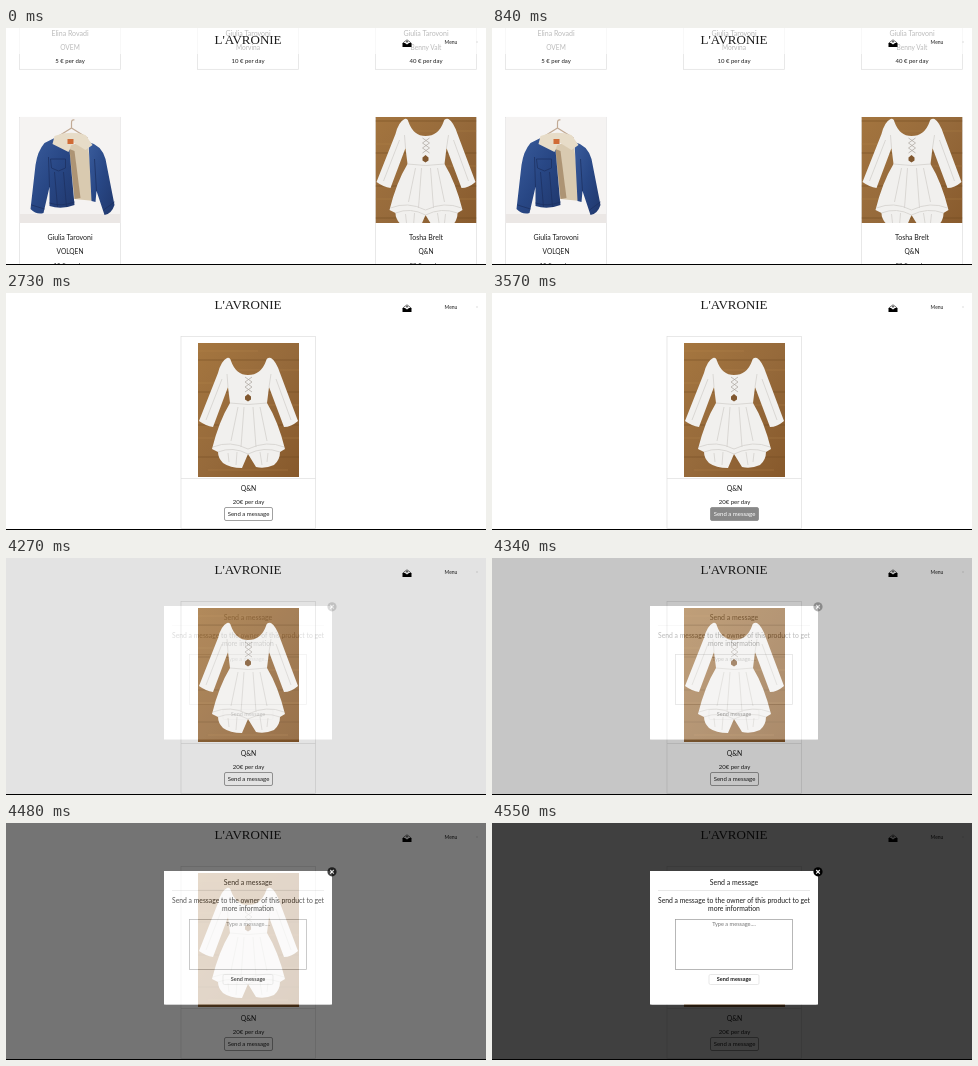
These frames come from a looping animation (480 by 237 pixels, 5.81 s). An HTML page:

```html
<!DOCTYPE html>
<html lang="en">
<head>
<meta charset="utf-8">
<title>Clothing rental</title>
<style>
  html, body { margin: 0; width: 100%; height: 100%; overflow: hidden; background: #fff; }
  svg { display: block; }
  text { font-family: Lato, "Open Sans", sans-serif; text-anchor: middle; fill: #1c1c1c; }
  .logo { font-family: "Liberation Serif", serif; }
  .hint { fill: #757575; }
  .line { fill: none; stroke: #dedede; stroke-width: .7; }
</style>
</head>
<body>
<svg id="stage" width="480" height="237" viewBox="0 0 480 237">
  <defs>
    <linearGradient id="wood" x2="1" y2="1">
      <stop stop-color="#a5763f"/><stop offset=".5" stop-color="#966a3b"/><stop offset="1" stop-color="#87592b"/>
    </linearGradient>
    <linearGradient id="denim" x2="1" y2="1">
      <stop stop-color="#3a5c9c"/><stop offset=".5" stop-color="#284785"/><stop offset="1" stop-color="#20376c"/>
    </linearGradient>

    <g id="dress">
      <rect width="101" height="134" fill="url(#wood)"/>
      <path d="M0 17H101M0 49H101M0 82H101M0 114H101" stroke="#6d4822" stroke-width=".7" opacity=".7"/>
      <path d="M0 8H60M30 27H101M0 40H40M60 62H101M0 95H101M10 127H90" stroke="#b58950" stroke-width=".6" opacity=".6"/>
      <path fill="#f1f0ee" d="M29 15Q32 14 33 18Q38 32 50 32Q63 32 68 18Q69 14 73 15Q78 18 82 30L100 78Q93 84 86 84L74 52L71 44L69 60Q80 78 87 106L82 109Q82 117 76 122Q67 126 58 124L50 111L44 125Q32 125 25 120Q20 115 20 109L14 106Q21 78 32 60L30 44L27 52L15 84Q8 83 1 78L20 30Q23 18 29 15Z"/>
      <path fill="none" stroke="#d3d1cd" stroke-width=".8" d="M32 60Q50 63 69 60M30 44L29 31M71 44L73 31M40 64L33 98M46 64L43 104M55 64L58 104M62 64L69 98M15 104Q32 97 50 106Q69 97 86 104M24 36L8 77M78 36L93 77M20 109Q35 103 50 111Q66 103 82 109M30 110L31 119M70 110L69 119M39 109L38 122M62 109L64 122"/>
      <path fill="none" stroke="#aaa49d" stroke-width=".7" d="M47 34L54 39L47 44L54 49M54 34L47 39L54 44L47 49"/>
      <path fill="#80572f" d="M50 51L53 53.500V56.500L50 58.500L47 56.500V53.500Z"/>
    </g>

    <g id="jacket">
      <rect width="101" height="106" fill="#f5f3f2"/>
      <path d="M0 97H101V106H0Z" fill="#ebe7e5"/>
      <path d="M36 21L52 11L68 21M52 11V6Q52 2 55 3" fill="none" stroke="#c2aa95" stroke-width="1.200"/>
      <path fill="#d9cab0" d="M49 28L68 25L75 84L55 82Z"/>
      <path fill="#ad9474" d="M50 32L55 34L61 81L55 82Z"/>
      <path fill="url(#denim)" d="M35 21L25 26Q18 34 16 48L11 92Q17 98 24 96L30 70V89Q42 93 55 88L50 33Z"/>
      <path fill="url(#denim)" d="M69 25Q82 28 86 42L95 88Q92 97 85 98L77 74L76 85L72 84Z"/>
      <path fill="#e7dcc8" d="M35 19Q50 13 66 18L73 28L66 33L53 25L49 35L33 27Z"/>
      <path fill="none" stroke="#1d3262" stroke-width=".8" d="M29 40L30 70M31 42H46V51L39 54L32 51ZM35 55L38 90M44 55L47 90M30 86Q42 90 55 85M77 74L75 42M12 88L25 92M84 93L95 85"/>
      <rect x="48" y="22" width="6" height="5" fill="#d06b35"/>
    </g>
  </defs>

  <g id="list"></g>
  <g id="product"></g>
  <g id="header"></g>
  <path id="shade" fill-rule="evenodd" d="M0 0H480V237H0ZM158 48V181.500H326V48Z"/>
  <g id="modal"></g>
  <path d="M0 236.500H480" stroke="#000"/>
</svg>
<script>
const LOOP = 5810, STEP = 70;
const $ = id => document.getElementById(id);
const clamp = v => Math.max(0, Math.min(1, v));

const text = (s, x, y, size, attrs = '') =>
  `<text x="${x}" y="${y}" font-size="${size}" ${attrs}>${s.replace('&', '&amp;')}</text>`;
const box = (x, y, w, h, attrs = 'class="line"') =>
  `<rect x="${x}" y="${y}" width="${w}" height="${h}" ${attrs}/>`;
const photo = (id, x, y, h, top = 0) =>
  `<svg x="${x}" y="${y}" width="101" height="${h}"><use href="#${id}" y="${-top}"/></svg>`;
const card = (x, y, name, brand, price) =>
  box(x - 50.5, y - 115, 101, 156) +
  text(name, x, y + 7.5, 7) + text(brand, x, y + 22, 6.6) + text(price + ' € per day', x, y + 35, 6);

$('list').innerHTML =
  card(64, 0.3, 'Elina Rovadi', 'OVEM', 5) +
  card(242, 0.3, 'Giulia Tarovoni', 'Morvina', 10) +
  card(420, 0.3, 'Giulia Tarovoni', 'Benny Valt', 40) +
  card(64, 204.3, 'Giulia Tarovoni', 'VOLQEN', 15) +
  card(420, 204.3, 'Tosha Brelt', 'Q&N', 20) +
  photo('jacket', 13.5, 89, 106) + photo('dress', 369.5, 89, 106, 13);

$('product').innerHTML =
  box(175, 43.5, 134.5, 192) + '<path class="line" d="M175 185.500H309.500"/>' +
  photo('dress', 192, 50, 134) +
  text('Q&N', 242.5, 198.3, 6.8) + text('20€ per day', 242.5, 211.2, 6) +
  box(218.5, 214.5, 48, 13, 'id="button" rx="1.500" stroke="#8a8a8a" stroke-width=".8"') +
  text('Send a message', 242.5, 223.2, 6, 'id="label"');

$('header').innerHTML =
  box(0, 0, 480, 26, 'fill="#fff" opacity=".7"') +
  text("L'AVRONIE", 242, 16, 13, 'class="logo"') +
  text('Menu', 445, 15.6, 5) +
  '<path d="M396.800 15L401 11.800L405.200 15" fill="#fff" stroke="#000" stroke-width=".6"/>' +
  '<path d="M396.500 15H399L401 16.500L403 15H405.500V19H396.500ZM400 13.200H402L401 15Z"/>' +
  '<path d="M470 14H472" stroke="#ddd"/>';

$('modal').innerHTML =
  box(158, 48, 168, 133.5, 'rx="2" fill="#fff"') +
  text('Send a message', 242, 62.3, 7) +
  '<path class="line" d="M166 67.500H318"/>' +
  text('Send a message to the owner of this product to get', 242, 80.3, 6.8) +
  text('more information', 242, 88.3, 6.8) +
  box(183.5, 96.5, 117, 50, 'fill="#fff" stroke="#999" stroke-width=".7"') +
  text('Type a message....', 242, 102.5, 5.6, 'class="hint"') +
  box(217, 151.5, 50, 10, 'class="line" rx="1.500"') +
  text('Send message', 242, 158.4, 5.5, 'font-weight="bold"') +
  '<circle cx="326" cy="48.800" r="4.600"/>' +
  '<path d="M324.200 47L327.800 50.600M327.800 47L324.200 50.600" stroke="#fff" stroke-width="1.100"/>';

function draw(t) {
  const onProduct = t >= 1680;
  $('list').style.display = onProduct ? 'none' : '';
  $('product').style.display = onProduct ? '' : 'none';

  const hover = clamp((t - 3360) / 210) * (1 - clamp((t - 4130) / 140));
  const mix = (a, b) => { const v = Math.round(a + (b - a) * hover); return `rgb(${v},${v},${v})`; };
  $('button').setAttribute('fill', mix(255, 136));
  $('label').style.fill = mix(28, 255);

  const fade = clamp((t - 4130) / 420) ** 1.75;
  $('shade').setAttribute('opacity', 0.75 * fade);
  $('modal').setAttribute('opacity', fade);
}

function tick() {
  const t = performance.now() % LOOP;
  draw(Math.floor(t / STEP) * STEP);
  requestAnimationFrame(tick);
}
tick();
</script>
</body>
</html>
```
